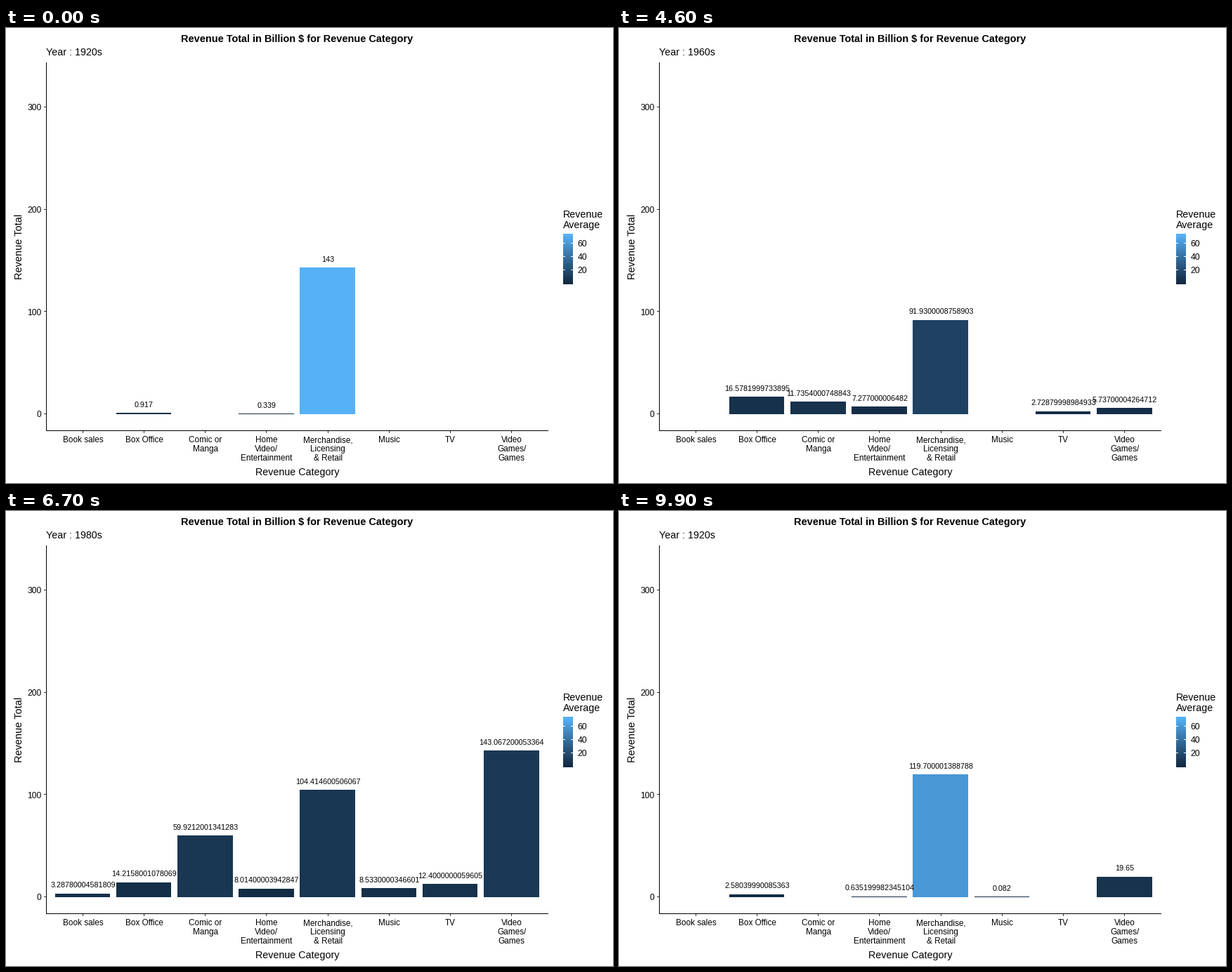
A matplotlib script that plays this animation: 864 px wide and 648 px high, repeating every 10000 ms.

```python
import math

import numpy as np
import matplotlib.pyplot as plt
from matplotlib.animation import FuncAnimation
from matplotlib.patches import Rectangle

plt.rcParams["font.family"] = "Liberation Sans"
plt.rcParams["toolbar"] = "None"

W, H = 864, 648
LEFT, RIGHT, TOP, BOTTOM = 57, 772.2, 49, 573
STEP = (RIGHT - LEFT) / 8.2
ZERO = 549.2
UNIT = 1.4566
TOP_AVERAGE = 71.5

LABELS = ["Book sales", "Box Office", "Comic or\nManga", "Home\nVideo/\nEntertainment",
          "Merchandise,\nLicensing\n& Retail", "Music", "TV", "Video\nGames/\nGames"]
BOOK, BOX, COMIC, HOME, MERCH, MUSIC, TV, GAMES = range(8)

# One entry per decade: category -> (total in billions, number of franchises)
DECADES = [
    {BOX: (0.917, 2), HOME: (0.339, 2), MERCH: (143, 2)},
    {BOOK: (9, 1), BOX: (12.299, 6), COMIC: (2.174, 2), HOME: (6.206, 5),
     MERCH: (50.32, 5), TV: (0.468, 1), GAMES: (0.096, 1)},
    {BOX: (0.866, 1), HOME: (0.512, 1), MERCH: (9.2, 1)},
    {BOOK: (0.55, 1), BOX: (7.727, 2), HOME: (3.181, 2), MERCH: (27, 3),
     TV: (0.096, 1), GAMES: (0.351, 1)},
    {BOX: (18.364, 5), COMIC: (6.71, 2), HOME: (6.842, 4), MERCH: (33.15, 5),
     TV: (3.41, 2), GAMES: (2.875, 3)},
    {BOOK: (1, 1), BOX: (9.435, 3), COMIC: (31.837, 4), HOME: (9.017, 3),
     MERCH: (327.05, 8), MUSIC: (0.003, 1), TV: (0.004, 1), GAMES: (17.185, 3)},
    {BOOK: (0.213, 1), BOX: (6.981, 3), COMIC: (50.92, 6), HOME: (5.368, 3),
     MERCH: (70.453, 14), MUSIC: (6.207, 3), TV: (12, 3), GAMES: (139.486, 17)},
    {BOOK: (7.9, 1), BOX: (25.068, 12), COMIC: (73.423, 13), HOME: (11.983, 12),
     MERCH: (155.357, 17), MUSIC: (12.022, 5), TV: (13, 3), GAMES: (148.439, 19)},
    {BOOK: (1, 1), BOX: (39.827, 12), COMIC: (13.518, 3), HOME: (11.309, 9),
     MERCH: (110.783, 12), TV: (8, 2), GAMES: (79.167, 9)},
    {BOX: (9.234, 4), HOME: (1.82, 3), MERCH: (26.5, 4), MUSIC: (0.082, 1),
     GAMES: (19.65, 4)},
]

# Colours are blended in CIE Lab
TO_XYZ = np.array([[0.4124, 0.3576, 0.1805],
                   [0.2126, 0.7152, 0.0722],
                   [0.0193, 0.1192, 0.9505]])
WHITE = TO_XYZ.sum(axis=1)
TO_LAB = np.array([[0, 116, 0], [500, -500, 0], [0, 200, -200]])


def rgb_to_lab(rgb):
    rgb = np.array(rgb) / 255
    linear = np.where(rgb > 0.04045, ((rgb + 0.055) / 1.055) ** 2.4, rgb / 12.92)
    xyz = TO_XYZ @ linear / WHITE
    f = np.where(xyz > 0.008856, np.cbrt(xyz), 7.787 * xyz + 16 / 116)
    return TO_LAB @ f - [16, 0, 0]


def lab_to_rgb(lab):
    fy = (lab[0] + 16) / 116
    f = np.array([fy + lab[1] / 500, fy, fy - lab[2] / 200])
    xyz = np.where(f > 0.2069, f ** 3, (f - 16 / 116) / 7.787) * WHITE
    linear = np.clip(np.linalg.solve(TO_XYZ, xyz), 0, 1)
    rgb = np.where(linear > 0.0031308, 1.055 * linear ** (1 / 2.4) - 0.055, 12.92 * linear)
    return np.clip(rgb, 0, 1)


LOW = rgb_to_lab((19, 43, 67))
HIGH = rgb_to_lab((86, 177, 247))


def mix(a, b, p):
    return (1 - p) * a + p * b


def fill_lab(total, count):
    return mix(LOW, HIGH, min(total / count / TOP_AVERAGE, 1))


fig = plt.figure(figsize=(W / 72, H / 72), dpi=72, facecolor="white")
ax = fig.add_axes([0, 0, 1, 1])
ax.axis("off")


def write(x, y, text, size, ha="center", **kw):
    return ax.text(x, y, text, fontsize=size, ha=ha, va="baseline", color="black", **kw)


def box(x, y, w, h, color, z=2):
    return ax.add_patch(Rectangle((x, y), w, h, fc=color, lw=0, zorder=z,
                                  antialiased=False))


def center(cat):
    return LEFT + (0.6 + cat) * STEP


def make_bar(cat):
    left = math.floor(center(cat) - 0.45 * STEP)
    right = math.floor(center(cat) + 0.45 * STEP)
    return box(left, 550, right - left, 0, "black")


def draw_axes():
    box(LEFT, TOP, 1, BOTTOM - TOP + 1, "black", 4)
    box(LEFT, BOTTOM, math.floor(RIGHT) - LEFT, 1, "black", 4)
    for value in range(0, 301, 100):
        y = ZERO - UNIT * value
        box(LEFT - 3, math.floor(y + 0.3), 3, 1, "#333333")
        write(50.3, round(y + 5), str(value), 12, "right")
    for cat, label in enumerate(LABELS):
        box(math.floor(center(cat)), BOTTOM + 1, 1, 3, "#333333")
        for row, line in enumerate(label.split("\n")):
            write(center(cat), 590 + 13 * row, line, 11.75)
    write(415, 637, "Revenue Category", 14.2)
    write(23, 311.5, "Revenue Total", 14.5, rotation=90, rotation_mode="anchor")
    write(414, 20, "Revenue Total in Billion $ for Revenue Category", 14.45,
          fontweight="bold")


def draw_legend():
    write(792.5, 270, "Revenue", 14.2, "left")
    write(792.5, 285, "Average", 14.2, "left")
    # The scale ends half a bin (of 20) inside the bar
    steps = np.clip(np.linspace(-0.026, 1.026, 72), 0, 1)
    ramp = [[lab_to_rgb(mix(HIGH, LOW, t))] for t in steps]
    ax.imshow(ramp, extent=(793, 807, 365, 293), aspect="auto",
              interpolation="nearest", zorder=2)
    for value in (60, 40, 20):
        y = round(363.2 - 68.4 * value / TOP_AVERAGE)
        box(793, y, 3, 1, "white", 3)
        box(804, y, 3, 1, "white", 3)
        write(813.5, y + 5, str(value), 12.2, "left")


draw_axes()
draw_legend()
ax.set_xlim(0, W)
ax.set_ylim(H, 0)

bars = [make_bar(c) for c in range(8)]
tags = [write(center(c), 550, "", 10.75, zorder=5) for c in range(8)]
year = write(57, 39, "", 14.3, "left")


def update(frame):
    index, tick = divmod(frame, 10)
    # Single precision gives the long decimals in the moving labels
    p = float(np.float32(max(tick - 5, 0) / 5))
    now, after = DECADES[index], DECADES[(index + 1) % 10]
    for cat, (bar, tag) in enumerate(zip(bars, tags)):
        shown = cat in now
        bar.set_visible(shown)
        tag.set_visible(shown)
        if not shown:
            continue
        start = now[cat]
        end = after.get(cat, start)
        value = mix(start[0], end[0], p) if end != start else start[0]
        height = max(math.ceil(UNIT * value - 0.05), 0)
        bar.set_y(550 - height)
        bar.set_height(height)
        bar.set_facecolor(lab_to_rgb(mix(fill_lab(*start), fill_lab(*end), p)))
        tag.set_text(f"{value:.15g}")
        tag.set_y(round(ZERO - UNIT * value - 8.1))
    closest = (index + (tick == 9)) % 10
    year.set_text(f"Year : {1920 + 10 * closest}s")
    return [*bars, *tags, year]


anim = FuncAnimation(fig, update, frames=100, interval=100, repeat=True, blit=False)
plt.show()
```
